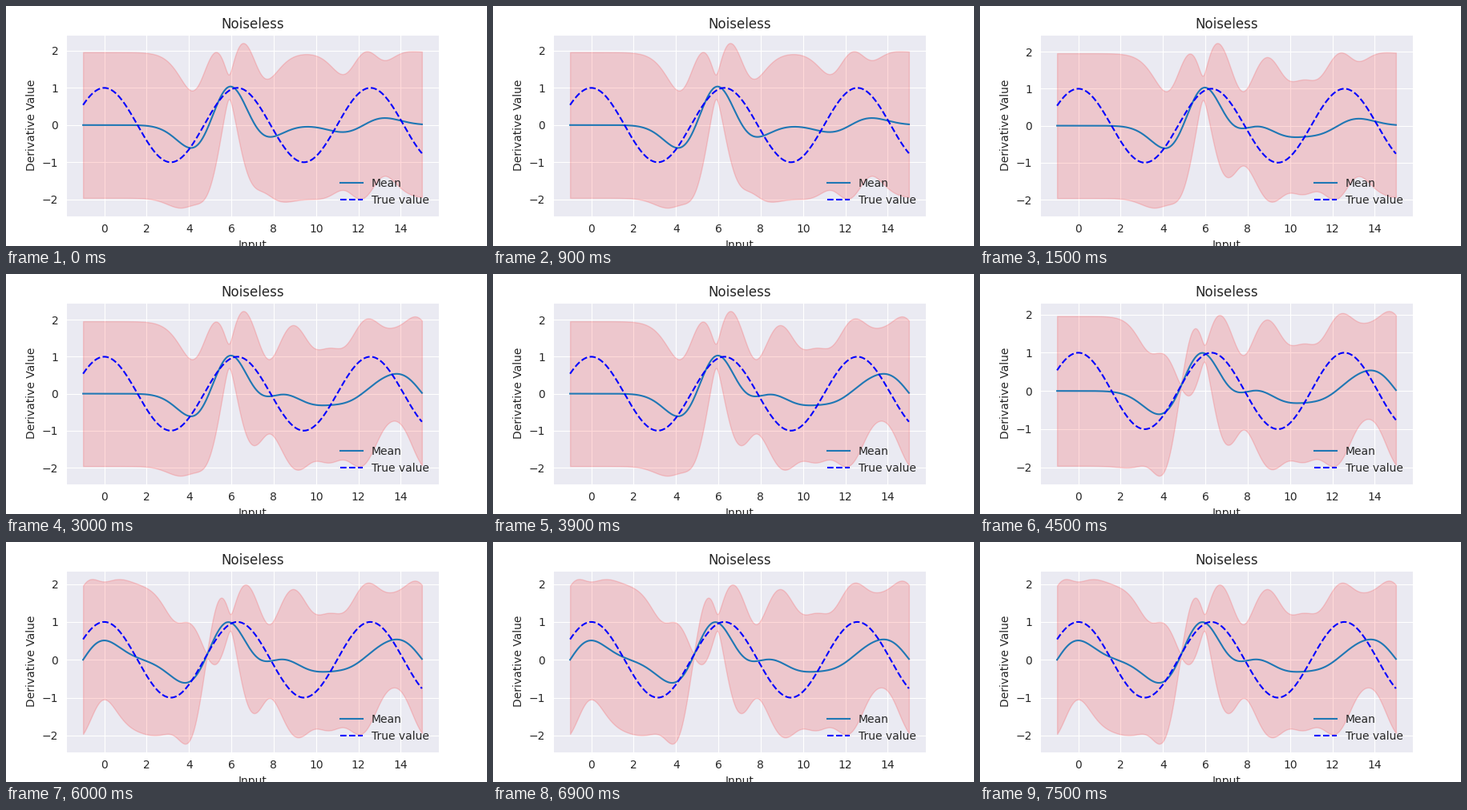
A matplotlib script for the animation above (8 s loop, 600 by 300 pixels).

```python
import numpy as np
import matplotlib.pyplot as plt
from matplotlib.animation import FuncAnimation

DARK = "0.15"
plt.rcParams.update({
    "font.family": "DejaVu Sans",
    "font.size": 10,
    "text.color": DARK,
    "axes.labelcolor": DARK,
    "axes.facecolor": "#EAEAF2",
    "axes.edgecolor": "white",
    "axes.grid": True,
    "axes.axisbelow": True,
    "grid.color": "white",
    "grid.linestyle": "-",
    "xtick.color": DARK,
    "ytick.color": DARK,
    "xtick.bottom": False,
    "ytick.left": False,
    "legend.frameon": False,
})

# Sample sites of sin(x); one more joins the first three at each step.
SITES = np.array([5.24, 6.53, 12.25, 8.98, 15.0, 4.48, -1.0])
START = 3
STEP_MS = 1500
TICK_MS = 500
LOOP_MS = 8000

x = np.linspace(-1, 15, 400)


def kernel(a, b):
    return np.exp(-0.5 * (a[:, None] - b[None, :]) ** 2)


def slope_posterior(sites):
    """Mean and deviation of the derivative of a unit RBF process."""
    gram = kernel(sites, sites) + 1e-9 * np.eye(len(sites))
    cross = -(x[:, None] - sites[None, :]) * kernel(x, sites)
    mean = cross @ np.linalg.solve(gram, np.sin(sites))
    known = np.sum(cross * np.linalg.solve(gram, cross.T).T, axis=1)
    return mean, np.sqrt(np.maximum(1 - known, 0))


fig, ax = plt.subplots(figsize=(6, 3), dpi=100)
fig.subplots_adjust(left=0.125, right=0.9, bottom=0.125, top=0.88)


def draw(frame):
    step = frame * TICK_MS // STEP_MS
    mean, dev = slope_posterior(SITES[:START + step])
    low, high = mean - 1.96 * dev, mean + 1.96 * dev

    ax.clear()
    ax.fill_between(x, low, high, color="red", alpha=0.15, linewidth=1)
    ax.plot(x, mean, color="#1f77b4", lw=1.5, label="Mean")
    ax.plot(x, np.cos(x), "b--", lw=1.5, label="True value")

    pad = 0.05 * (high.max() - low.min())
    ax.set_xlim(-1.8, 15.8)
    ax.set_ylim(low.min() - pad, high.max() + pad)
    ax.set_xticks(range(0, 15, 2))
    ax.set_yticks(range(-2, 3))
    ax.tick_params(length=3.5, pad=3.5)
    ax.set_title("Noiseless", fontsize=12, pad=6)
    ax.set_xlabel("Input")
    ax.set_ylabel("Derivative Value")
    ax.legend(loc="lower right")
    return []


anim = FuncAnimation(fig, draw, frames=LOOP_MS // TICK_MS, init_func=lambda: [],
                     interval=TICK_MS, repeat=True, repeat_delay=0)
plt.show()
```
